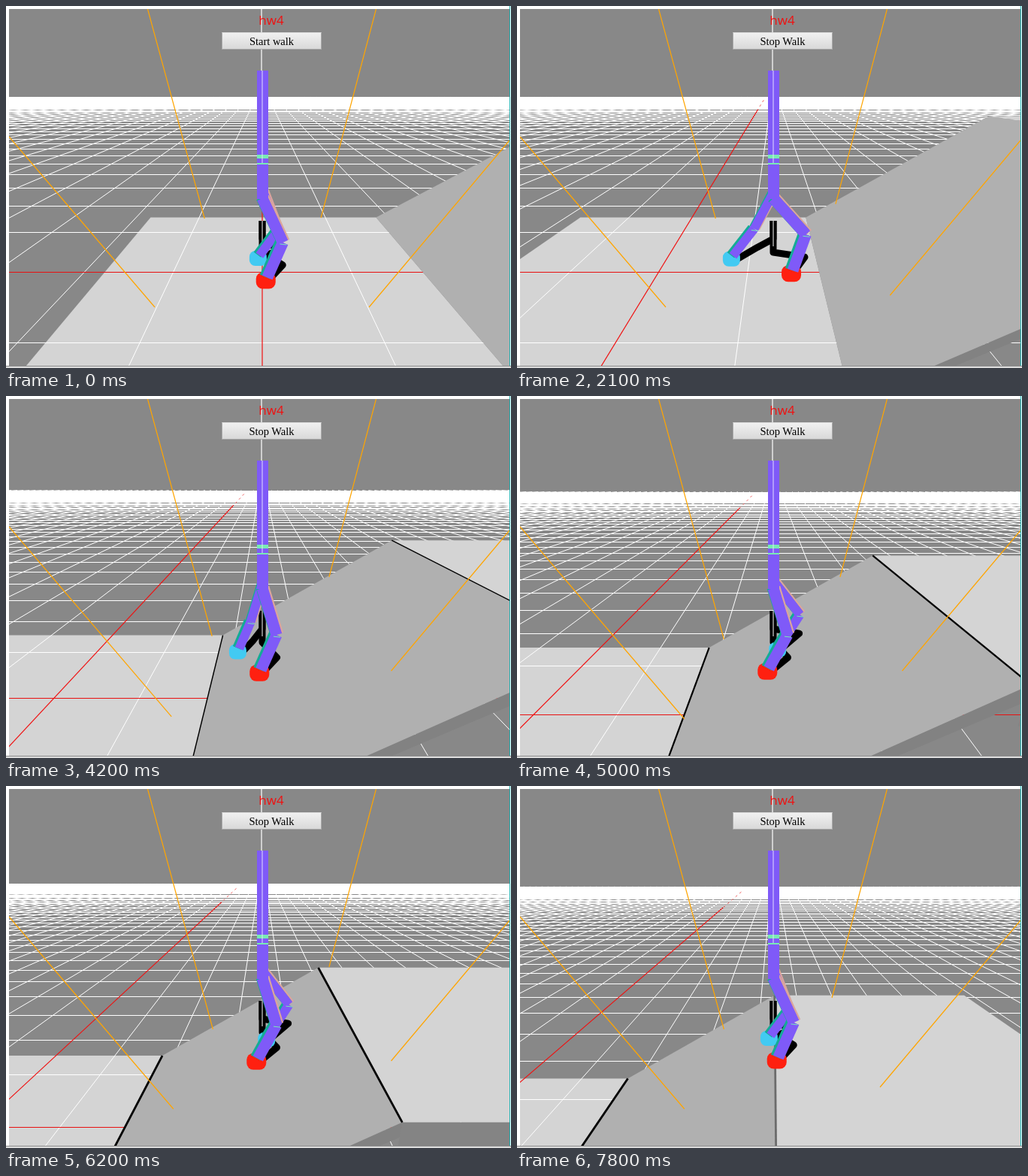
An HTML page with a canvas for the animation above (7.9 s loop, 672 by 482 pixels).

```html
<!DOCTYPE html>
<html lang="en">
<head>
<meta charset="utf-8">
<title>hw4</title>
<style>
html, body { margin: 0; width: 672px; height: 482px; overflow: hidden; background: #fff; }
canvas { position: absolute; left: 0; top: 0; }
#title, #button { position: absolute; text-align: center; white-space: nowrap; }
#title { left: 303px; top: 8px; width: 100px; font: 17px/22px "Open Sans", "Noto Sans", sans-serif; color: #f01010; }
#button {
  left: 287px; top: 35px; width: 131px; height: 21px; border: 1px solid #aaa; border-top-color: #ddd;
  background: linear-gradient(#f0f0f0, #d9d9d9); font: 14.5px/22px "Liberation Serif", serif; color: #000;
}
</style>
</head>
<body>
<canvas id="stage" width="672" height="482"></canvas>
<div id="title">hw4</div>
<div id="button">Start walk</div>
<script>
const ctx = document.getElementById('stage').getContext('2d');
const button = document.getElementById('button');
const LOOP = 7900, STEP = 100;

// Camera: 60 degree field of view, 3 units away and 2 up, looking at height 1
const CX = 341, CY = 241.5, DIST = 3;
const F = 237.5 / Math.tan(Math.PI / 6);
const PITCH = Math.atan(1 / DIST), COS = Math.cos(PITCH), SIN = Math.sin(PITCH);
const HORIZON = CY - F / DIST;

// World: grid cells, floor slab, ramp and upper slab
const CELLS = 50, BACK = -1.5, FRONT = 1.5;
const FLOOR_X = -1.77, RAMP_X = 1.805, TOP_X = 4.36, END_X = 7.36, TOP_Y = 1.576;

const PURPLE = '#7f5af8', TEAL = '#14ab96', TAN = '#dba59c', MINT = '#78eab4';

// Poses: near thigh, near shin, far thigh, far shin (degrees), far shin length
const STAND = [25, -24, 21, -37, 41];
const GAIT = [
  { at: 0, pose: [36, -10, -44, -44, 59] },
  { at: 1 / 6, pose: [17, -29, 38, -33, 51] },
  { at: 0.5, pose: [17, -24, -17, -23, 39] },
  { at: 0.75, pose: [42, -20, -28, -38, 46] },
];
const PERIOD = 1.2;

const mix = (a, b, k) => a.map((v, i) => v + (b[i] - v) * k);
function smooth(from, to, t) {
  const k = Math.max(0, Math.min(1, (t - from) / (to - from)));
  return k * k * (3 - 2 * k);
}

function poseAt(t) {
  const phase = (t / PERIOD + 1e-6) % 1;
  const i = GAIT.findLastIndex(key => key.at <= phase);
  const a = GAIT[i], b = GAIT[(i + 1) % GAIT.length];
  const k = (phase - a.at) / ((b.at || 1) - a.at);
  const walking = smooth(0.2, 0.8, t) - smooth(6.9, 7.8, t);
  return mix(STAND, mix(a.pose, b.pose, k), walking);
}

let camX = 0, camY = 2;
function moveCamera(t) {
  // quick start, level walk, then slower uphill
  camX = Math.max(0, Math.min(0.753 * (t - 0.2), 0.039 + 0.595 * t, 0.245 + 0.525 * t));
  camY = 2.003 + 0.553 * Math.max(0, camX - 1.553);
}
function project(x, y, z) {
  const h = camY - y;
  const depth = (DIST - z) * COS + h * SIN;
  return [CX + F * (x - camX) / depth, HORIZON + F * h / COS / depth];
}

function path(points, color, width = 1) {
  ctx.strokeStyle = color;
  ctx.lineWidth = width;
  ctx.beginPath();
  points.forEach(p => ctx.lineTo(p[0], p[1]));
  ctx.stroke();
}
function quad(color, ...points) {
  ctx.fillStyle = color;
  ctx.beginPath();
  points.forEach(p => ctx.lineTo(...project(...p)));
  ctx.fill();
}
function rect(color, x, y, w, h) {
  ctx.fillStyle = color;
  ctx.fillRect(x, y, w, h);
}
// Surface running from (x1, y1) to (x2, y2) over the full depth
function slab(color, x1, y1, x2, y2) {
  quad(color, [x1, y1, BACK], [x2, y2, BACK], [x2, y2, FRONT], [x1, y1, FRONT]);
}
function frontFace(color, x1, y1, x2, y2, deep1, deep2) {
  quad(color, [x1, y1, FRONT], [x2, y2, FRONT], [x2, y2 - deep2, FRONT], [x1, y1 - deep1, FRONT]);
}

function drawGrid() {
  for (let i = -CELLS; i <= CELLS; i++) {
    if (i) path([project(i, 0, -CELLS), project(i, 0, 2.6)], '#fff');
  }
  for (let i = -CELLS; i <= 2; i++) {
    rect(i ? '#fff' : '#e81010', 4, Math.round(project(0, 0, i)[1]), 666, 1);
  }
  path([project(0, 0, -24), project(0, 0, 2.6)], '#f01010', 1.2);
  ctx.setLineDash([3, 4]);
  path([project(0, 0, -40), project(0, 0, -24)], '#f06060');
  ctx.setLineDash([]);
}

function drawRamp(t) {
  frontFace('#828282', RAMP_X, 0, TOP_X, TOP_Y, 0.07, 0.12);
  slab('#b0b0b0', RAMP_X, 0, TOP_X, TOP_Y);
  frontFace('#848484', TOP_X, TOP_Y, END_X, TOP_Y, 0.3, 0.3);
  slab('#d4d4d4', TOP_X, TOP_Y, END_X, TOP_Y);

  const width = Math.min(2.8, (t - 3) * 0.9 + 0.4);
  if (width <= 0) return;
  const seam = (x, y, color) => path([project(x, y, BACK), project(x, y, FRONT)], color, width);
  seam(RAMP_X, 0, '#000');
  seam(TOP_X, TOP_Y, t > 7.3 ? '#6c6c6c' : '#000');
}

// Edges of the light cones; each ends where it meets floor or ramp
function drawRays(t) {
  const left = smooth(2.6, 4.6, t);
  const right = smooth(1.4, 2.9, t) - smooth(6.3, 7.8, t);
  const ray = (x, y, slope, end) => path([[x, y], [x + (end - y) * slope, end]], '#ffa500', 1.2);
  ray(188.5, 4, 0.2715, 283 + 41 * left);
  ray(4, 174, 0.8546, 401 + 29 * left);
  ray(492.5, 4, -0.264, 282 - 41 * right);
  ray(670, 179, -0.842, 401 - 35 * right);
}

function reach([x, y], angle, length) {
  const a = angle * Math.PI / 180;
  return [x + Math.sin(a) * length, y + Math.cos(a) * length];
}
const shift = (p, dx, dy) => [p[0] + dx, p[1] + dy];

function limb(hip, thigh, a, shin, b) {
  const knee = reach(hip, thigh, a);
  return [hip, knee, reach(knee, shin, b)];
}
function drawFoot([x, y], w, h, color) {
  ctx.fillStyle = color;
  ctx.beginPath();
  ctx.roundRect(x - w / 2, y - h / 2, w, h, w * 0.34);
  ctx.fill();
}
function drawLeg([hip, knee, ankle], width, foot) {
  drawFoot(shift(ankle, -2, 4), ...foot);
  path([shift(knee, -3, -1), shift(ankle, -3, -1)], TEAL, width);
  path([shift(hip, 2, -1), shift(knee, 2, -1)], TAN, width);
  path([shift(hip, -1, -1), shift(knee, -1, -1)], TEAL, width);
  path([knee, ankle], PURPLE, width);
  path([hip, knee], PURPLE, width);
  path([shift(knee, -4, 2), shift(knee, 5, 3)], MINT);
}
function drawShadow([, knee, ankle], hipY, drop) {
  const cast = (p, dy) => [CX + (p[0] - CX) * 0.92 + 2, p[1] + dy];
  path([[CX, 286], [CX, hipY], cast(knee, drop), cast(ankle, 4)], '#000', 9);
}

function drawWalker(t) {
  const [nearThigh, nearShin, farThigh, farShin, farLength] = poseAt(t);
  const near = limb([341, 256], nearThigh, 65, nearShin, 51);
  const far = limb([342, 247], farThigh, 56, farShin, farLength);

  ctx.lineJoin = 'round';
  drawShadow(far, 310, 25);
  drawShadow(near, 328, 30);
  path([[341, 286], [341, 320]], '#fff');

  drawLeg(far, 12, [23, 20, '#42caf2']);
  drawLeg(near, 15, [26, 22, '#ff2010']);

  rect(PURPLE, 334, 86, 15, 171);
  rect(MINT, 334, 198, 15, 5);
  rect(MINT, 334, 209, 15, 2);
  path([[340, 4], [340, 86]], '#fff', 1.2);
  path([[341, 86], [341, 209]], '#e4dcff');
}

function render(now) {
  const ms = Math.floor((now % LOOP) / STEP) * STEP;
  const t = ms / 1000;
  moveCamera(t);

  rect('#fff', 0, 0, 672, 482);
  ctx.save();
  ctx.beginPath();
  ctx.rect(4, 4, 666, 475);
  ctx.clip();
  rect('#888', 4, 4, 666, 475);
  slab('#d4d4d4', FLOOR_X, 0, RAMP_X, 0);
  drawGrid();
  drawRamp(t);
  drawRays(t);
  drawWalker(t);
  ctx.restore();
  rect('#19b5b5', 670, 0, 1, 480);
  rect('#8c8c8c', 0, 479, 672, 1);
  rect('#dcdcdc', 0, 480, 672, 2);

  const label = ms < 100 ? 'Start walk' : 'Stop Walk';
  if (button.textContent !== label) button.textContent = label;
}

const start = performance.now();
function tick() {
  render(performance.now() - start);
  requestAnimationFrame(tick);
}
tick();
</script>
</body>
</html>
```
